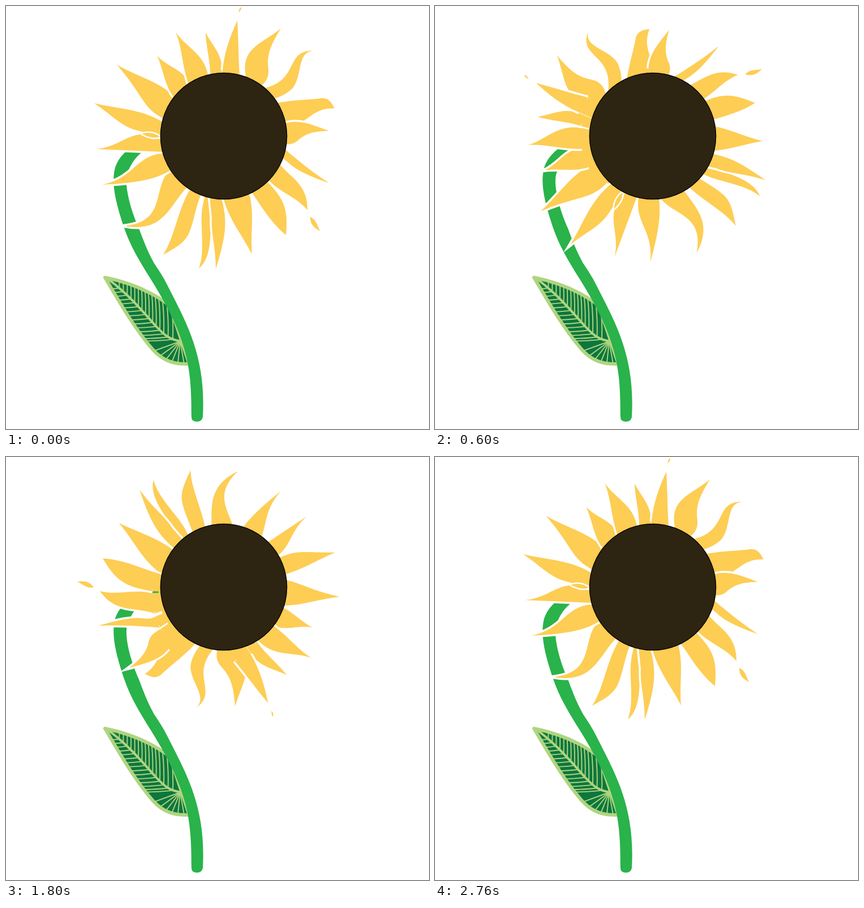
An HTML page that plays this animation: 748 by 748 pixels, repeating every 3 s.

```html
<!DOCTYPE html>
<html lang="en">
<head>
<meta charset="utf-8">
<title>Sunflower</title>
<style>
  html, body { margin: 0; height: 100%; overflow: hidden; background: #fff; }
  svg { display: block; width: 100vw; height: 100vh; }
  #ring { fill: #fdcd54; stroke: #fff; stroke-width: 7; stroke-miterlimit: 10; paint-order: stroke; }
  #ring .bare { stroke: none; }
  #ring .lens { stroke-width: 5; }
  #veins { fill: none; stroke: #afd580; stroke-width: 1.9; }
</style>
</head>
<body>
<svg viewBox="0 0 748 748">
  <defs>
    <path id="blade" d="M175 480 C215 488 255 503 290 530 L324 633 C298 634 278 628 260 608 C230 574 203 528 175 480Z"/>
    <clipPath id="inside"><use href="#blade"/></clipPath>
  </defs>

  <use href="#blade" fill="#0d773d"/>
  <g id="veins" clip-path="url(#inside)">
    <path id="rib" stroke-width="4" d="M178 481 C215 508 240 538 265 566 C280 582 290 591 312 593"/>
  </g>
  <use href="#blade" fill="none" stroke="#afd580" stroke-width="6" stroke-linejoin="round"/>

  <path fill="#29b34a" d="M328 727 C328 655 325 605 279 522 C250 470 225 440 208 390 C193 345 187 315 192 290
    C197 265 225 238 272 231 L274 243 C250 249 227 262 215 295 C208 315 220 360 235 393
    C245 420 252 437 262 455 C270 467 278 479 285 493 C320 562 354 620 348 727 Q346 735 338 735 Q328 735 328 727Z"/>

  <g id="ring">
    <circle class="bare" cx="369.7" cy="239.5" r="100"/>
    <g id="loose">
      <path d="M424 122 C416 75 450 68 486 40 C462 78 462 92 464 112 C465 126 460 134 450 142"/>
      <path d="M452 146 C520 134 492 78 543 79 C512 82 526 128 504 148 C492 158 482 162 466 166"/>
      <path d="M476 172 C505 166 540 166 557 163 C571 162 575 170 581 181 C552 180 543 193 526 203 C515 205 505 203 490 210"/>
    </g>
    <path d="M495 207 C520 200 545 211 571 221 C545 221 530 226 518 236 C508 246 500 245 486 244"/>
    <path d="M486 247 C510 268 540 293 571 313 C540 302 515 292 498 276 C490 269 488 268 480 267"/>
    <path d="M478 272 C498 302 534 312 533 361 C512 336 485 331 460 304"/>
    <path d="M458 306 C490 340 500 355 495 405 C465 380 450 350 435 331"/>
    <path d="M429 328 C440 365 432 395 435 439 C418 405 395 380 383 336"/>
    <path d="M358 333 C364 390 366 445 341 464 C354 430 341 385 348 352 L352 334"/>
    <path d="M379 334 C394 380 388 410 371 465 C371 425 362 400 364 375 L360 336"/>
    <path d="M345 333 C335 355 332 385 322 405 C312 422 298 428 278 440 C300 405 303 360 327 322"/>
    <path d="M321 320 C290 350 280 402 211 389 C285 380 258 322 289 291"/>
    <path d="M290 291 C260 310 215 314 170 316 C228 304 228 264 280 260"/>
    <path d="M278 235 C255 222 228 224 205 208 C188 197 180 188 156 172 C205 183 240 182 280 207"/>
    <path d="M280 258 L159 253 C195 250 210 230 238 227 C250 229 262 234 275 236"/>
    <path class="lens" d="M240 226 C252 222 264 225 272 231 C262 235 252 232 240 226"/>
    <path d="M280 200 C240 180 245 160 196 104 C240 128 275 135 300 163"/>
    <path d="M296 160 C280 140 278 110 267 88 C285 108 315 112 324 138"/>
    <path d="M323 139 C310 100 312 75 300 46 C320 75 353 85 358 127"/>
    <path d="M361 126 C362 100 354 75 353 47 C366 72 383 85 382 116"/>
    <path d="M383 114 C386 80 398 50 409 26 C411 60 411 90 413 121"/>
    <path class="bare" d="M412 12 C411 6 414 3 416 2 C417 7 413 8 412 12"/>
    <path class="bare" d="M538 373 C550 378 550 390 556 398 C543 392 538 385 538 373"/>
  </g>
  <circle cx="385" cy="230" r="111.7" fill="#2d2412" stroke="#000" stroke-width="1.3"/>
</svg>
<script>
  const $ = id => document.getElementById(id);
  const rib = $('rib'), length = rib.getTotalLength();

  function vein(d) {
    const path = document.createElementNS('http://www.w3.org/2000/svg', 'path');
    path.setAttribute('d', d);
    $('veins').append(path);
  }
  for (let i = 0; i < 15; i++) {
    const { x, y } = rib.getPointAtLength(length * (0.16 + 0.053 * i));
    vein(`M${x} ${y} q1 -30 -2 ${-45 - i}`);
    vein(`M${x} ${y} q-20 3 -75 4`);
  }
  for (let angle = 80; angle < 165; angle += 16) {
    const a = angle * Math.PI / 180;
    vein(`M308 593 l${70 * Math.cos(a)} ${70 * Math.sin(a)}`);
  }

  // A wedge without outline joins each petal to the middle of the ring.
  for (const petal of document.querySelectorAll('#ring path:not([class])')) {
    const wedge = petal.cloneNode();
    wedge.setAttribute('class', 'bare');
    wedge.setAttribute('d', petal.getAttribute('d') + ' L369.7 239.5');
    petal.before(wedge);
  }

  // The ring turns a fifth per step; three petals also slip inward.
  const slip = ['0 0', '-19 6', '-28 16', '-26 15'];
  function draw(now) {
    const step = Math.floor(now % 3000 / 600) % 4;
    $('ring').setAttribute('transform', `rotate(${-72 * step} 369.7 239.5)`);
    $('loose').setAttribute('transform', `translate(${slip[step]})`);
    requestAnimationFrame(draw);
  }
  draw(performance.now());
</script>
</body>
</html>
```
